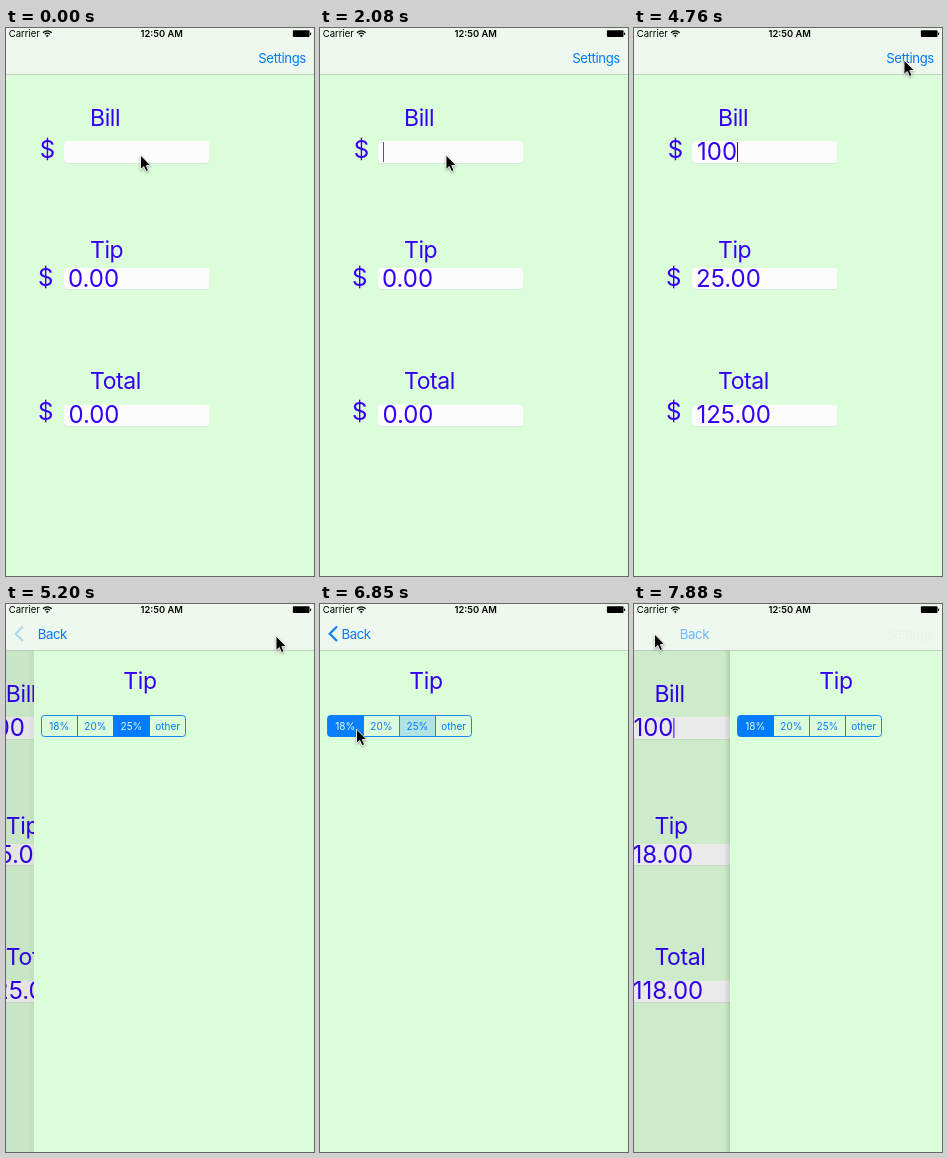
An HTML page that plays this animation: 308x548 px, repeating every 8 s.

```html
<!DOCTYPE html>
<html lang="en">
<head>
<meta charset="utf-8">
<title>Tip calculator</title>
<style>
  html, body { margin: 0; height: 100%; overflow: hidden; background: #dcfdd9; }
  svg { display: block; width: 100vw; height: 100vh; font-family: Inter, Roboto, sans-serif; }
  .value { font-size: 24px; fill: #3400f5; }
  .label { font-size: 23px; letter-spacing: -.4px; fill: #3400f5; }
  .link { font-size: 13.2px; letter-spacing: -.4px; fill: #007aff; }
  .segment { font-size: 10px; text-anchor: middle; }
  #cursor { filter: drop-shadow(0 1px 1px rgba(0, 0, 0, .35)); }
</style>
</head>
<body>
<svg viewBox="0 0 308 548">
  <defs>
    <linearGradient id="edge">
      <stop offset="0" stop-opacity="0"/>
      <stop offset="1" stop-opacity=".14"/>
    </linearGradient>
    <clipPath id="pill"><rect x="7.5" y="111.5" width="144" height="21" rx="3"/></clipPath>
  </defs>
  <rect width="308" height="548" fill="#dcfdd9"/>

  <g id="main">
    <g id="fields"></g>
    <rect id="caret" y="114" width="1" height="20" fill="#3400f5"/>
  </g>
  <rect id="dim" width="308" height="548"/>

  <g id="settings">
    <rect id="shadow" x="-6" width="6" height="548" fill="url(#edge)"/>
    <rect width="308" height="548" fill="#dcfdd9"/>
    <text class="label" x="89.3" y="84.5">Tip</text>
    <g id="segments" clip-path="url(#pill)"></g>
    <path d="M43.5 112v20M79.5 112v20M115.5 112v20" stroke="#007aff" stroke-width=".9"/>
    <rect x="7.5" y="111.5" width="144" height="21" rx="3" fill="none" stroke="#007aff" stroke-width=".9"/>
  </g>

  <rect width="308" height="46" fill="#eef8ee"/>
  <rect y="46" width="308" height=".7" fill="#acc4ac"/>
  <text x="2.8" y="9.3" font-size="9.5">Carrier</text>
  <g fill="none" stroke="#000" stroke-width="1.2">
    <path d="M37 4.7a6.2 6.2 0 0 1 8.6 0M38.7 6.4a3.8 3.8 0 0 1 5.2 0"/>
    <path d="M41.3 9.2l-1.4-1.5a2 2 0 0 1 2.8 0z" fill="#000" stroke="none"/>
  </g>
  <text x="155.7" y="9.3" font-size="9.3" font-weight="600" text-anchor="middle">12:50 AM</text>
  <rect x="286.9" y="2.2" width="16.6" height="6.8" rx="1"/>
  <rect x="304" y="4.4" width="1.2" height="2.5" rx=".6"/>
  <path id="chevron" d="M17 22.5l-7.3 7.2 7.3 7.2" fill="none" stroke="#007aff" stroke-width="2.1"/>
  <text id="back" class="link" y="34.6">Back</text>
  <text id="open" class="link" x="252.3" y="34.6">Settings</text>

  <path id="cursor" d="M0 0V14.6L3.3 11.5 5.5 16.6 8 15.5 5.8 10.6H10.4Z" stroke="#fff" stroke-width=".9"/>
</svg>
<script>
const $ = id => document.getElementById(id);
const LOOP = 8000, WIDTH = 308;
const FRAME = 148.6, LEAD = 6;
const FOCUS = 590, TYPE = 3120, PUSH = 5020, PICK = 6715, POP = 7847.8;

// Mouse journeys: start and end time, destination, height of the arc
const journeys = [
  [0, 290, 126, 127, 0],
  [3720, 4750, 270, 32, 60],
  [5450, 6240, 36.5, 125, -37],
  [7150, 7575, 20.5, 30, 0],
];

const clamp = (v, low = 0, high = 1) => Math.min(high, Math.max(low, v));
const settle = (t, start) => t < start ? 0 : 1 - Math.exp((start - t) / 75);
function ease(t, start, end) {
  const p = clamp((t - start) / (end - start));
  return p * p * (3 - 2 * p);
}
const move = (id, x, y = 0) => $(id).setAttribute('transform', `translate(${x} ${y})`);
const fade = (id, value) => $(id).setAttribute('opacity', value);

const field = (id, name, labelY, boxY, height, dollarX, dollarY, valueX, valueY) => `
  <text class="label" x="84" y="${labelY}">${name}</text>
  <text class="value" x="${dollarX}" y="${dollarY}">$</text>
  <rect x="58" y="${boxY + .5}" width="145.5" height="${height}" rx="3.5" fill="#cbdccb"/>
  <rect x="58" y="${boxY}" width="145.5" height="${height}" rx="3.5" fill="#fcfcfd"/>
  <text class="value" id="${id}" x="${valueX}" y="${valueY}"></text>`;
$('fields').innerHTML =
  field('bill', 'Bill', 98, 113, 22, 33.8, 130, 63, 131.7) +
  field('tip', 'Tip', 230, 240, 21, 32, 258, 62, 259) +
  field('total', 'Total', 361, 376.7, 21.2, 32, 392, 62.4, 395);

$('segments').innerHTML = ['18%', '20%', '25%', 'other'].map((name, i) => `
  <rect id="fill${i}" x="${7.5 + 36 * i}" y="111" width="36" height="22" fill="#007aff" opacity="0"/>
  <text class="segment" id="name${i}" x="${25.3 + 36.1 * i}" y="125.6" fill="#007aff">${name}</text>`).join('');

function select(i, amount) {
  fade('fill' + i, amount);
  $('name' + i).setAttribute('fill', amount > .5 ? '#e4fbef' : '#007aff');
}

function drawAmounts(t) {
  const bill = '100'.slice(0, clamp(1 + Math.round((t - TYPE) / 225), 0, 3));
  const tip = bill * (t < PICK ? .25 : .18);
  $('bill').textContent = bill;
  $('tip').textContent = tip.toFixed(2);
  $('total').textContent = (+bill + tip).toFixed(2);

  const typing = t >= TYPE && t < TYPE + 800;
  const blink = clamp(.5 + 1.5 * Math.cos((t - 860) * 2 * Math.PI / 1000));
  $('caret').setAttribute('x', Math.round(63 + $('bill').getComputedTextLength()));
  fade('caret', t < FOCUS ? 0 : typing ? 1 : blink);
}

function drawPages(t) {
  const shown = settle(t, PUSH) - settle(t, POP);
  const offset = Math.round(WIDTH * (1 - shown));
  move('main', -.3 * WIDTH * shown);
  fade('dim', .1 * shown);
  move('settings', offset);
  fade('settings', shown > 0 ? 1 : 0);
  fade('shadow', clamp(3 * (1 - shown)));
  move('back', 21.4 + offset ** .7);
  fade('back', clamp((shown - .45) * 2.2));
  fade('chevron', shown ** 14);
  fade('open', (1 - shown) ** 3);

  const old = 1 - settle(t, PICK);
  select(0, 1 - old ** 2);
  select(2, old);
}

function drawCursor(t) {
  let x = 134.5, y = 127;
  for (const [start, end, toX, toY, lift] of journeys) {
    const p = ease(t, start, end);
    x += (toX - x) * p;
    y += (toY - y) * p - lift * Math.sin(Math.PI * p);
  }
  move('cursor', x, y);
}

const begin = performance.now();
function tick() {
  const elapsed = (performance.now() - begin) % LOOP;
  const t = Math.floor((elapsed + LEAD) / FRAME) * FRAME;
  drawAmounts(t);
  drawPages(t);
  drawCursor(t);
  requestAnimationFrame(tick);
}
tick();
</script>
</body>
</html>
```
